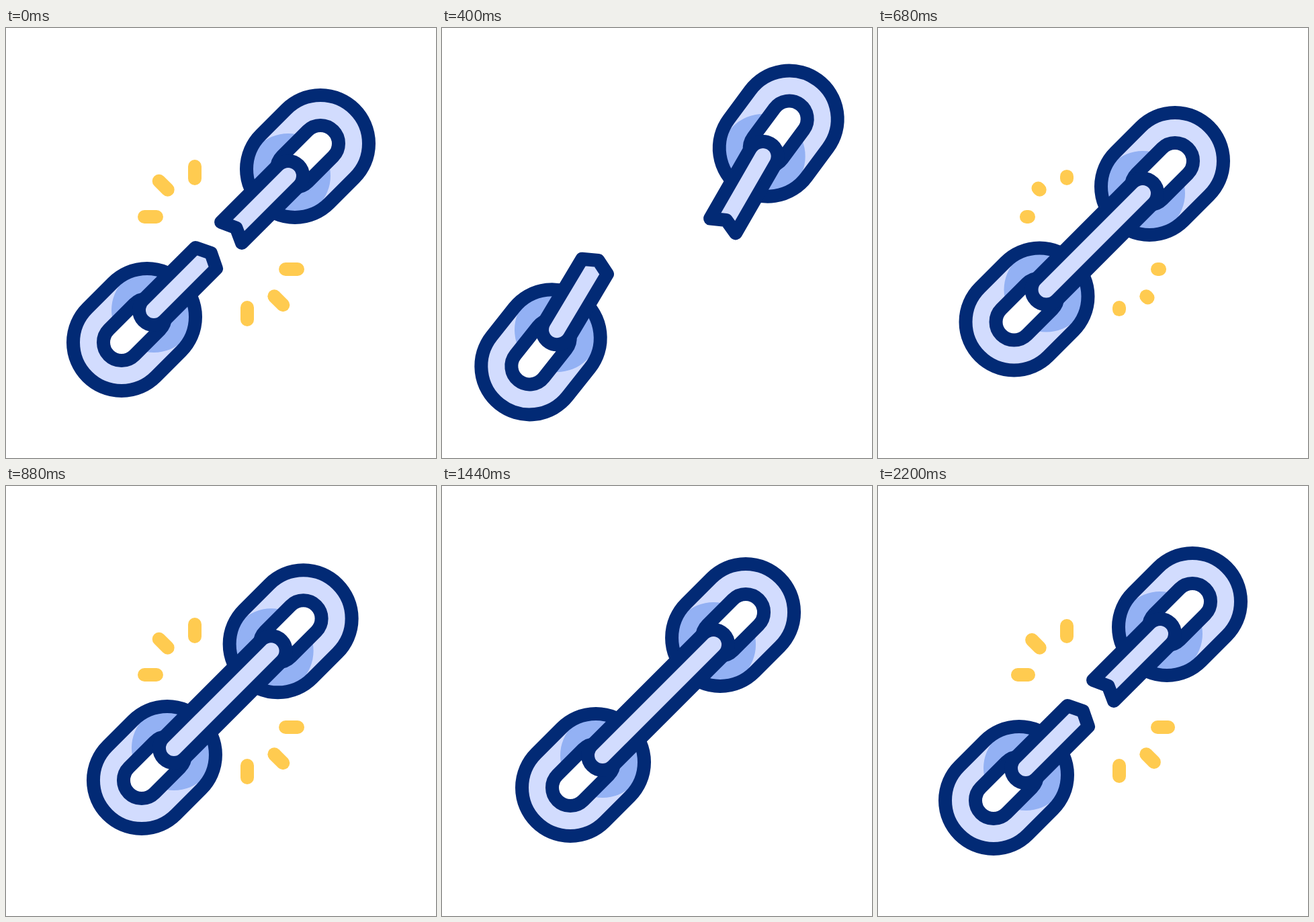
These frames come from a looping animation (640 px wide and 640 px high, 2.24 s). An HTML page with a canvas:

```html
<!DOCTYPE html>
<html lang="en">
<head>
<meta charset="utf-8">
<title>Chain link</title>
<style>
html, body { margin: 0; width: 100%; height: 100%; overflow: hidden; background: #fff; }
canvas { display: block; width: 100vw; height: 100vh; }
</style>
</head>
<body>
<canvas id="stage" width="640" height="640"></canvas>
<script>
const ctx = document.getElementById('stage').getContext('2d');
const LOOP = 2240;
const NAVY = '#022a75', PALE = '#d2dcfe', MID = '#93b1f4', GOLD = '#ffcb50';
const LINE = 20, OUTER = 72, HOLE = 27, BAR = 22, SHADE = 63;

// home: pivot at rest; side: +1 upper right, -1 lower left
// away: apex offset and tilts in degrees; shut / held: inward shifts
const halves = [
  { home: [430, 210], side: 1, away: [56, -32, 8.7, 15.4], shut: 26, held: 24.3,
    tips: [[-110, 79], [-87.5, 87.5], [-79, 110]] },
  { home: [210, 430], side: -1, away: [-47.3, 32, 6.7, 14.5], shut: 30.5, held: 29,
    tips: [[72, -103], [95, -95], [103, -72]] }
];

const clamp = u => Math.min(1, Math.max(0, u));
const span = (t, a, b) => clamp((t - a) / (b - a));
const smooth = u => u * u * (3 - 2 * u);
const mix = (a, b, u) => a + (b - a) * u;

function pose(h, t) {
  const inward = s => [-s * h.side, s * h.side, 0, 0];
  let from, to, u;
  if (t < 440) {
    from = inward(0); to = h.away; u = smooth(t / 440);
  } else if (t < 680) {
    from = h.away; to = inward(h.shut); u = smooth(span(t, 440, 680));
  } else if (t < 1220) {
    from = inward(h.shut); to = inward(h.held); u = span(t, 680, 1220);
  } else {
    from = inward(h.held); to = inward(0); u = smooth(span(t, 1220, 1780));
  }
  const [dx, dy, tilt, swing] = from.map((v, i) => mix(v, to[i], u));
  const x = h.home[0] + dx, y = h.home[1] + dy;
  const place = ([px, py], deg) => {
    const a = -deg * Math.PI / 180, c = Math.cos(a), s = Math.sin(a);
    return [x + px * c - py * s, y + px * s + py * c];
  };
  return {
    near: [x, y],
    far: place([38 * h.side, -38 * h.side], tilt),
    end: place([-10 * h.side, 10 * h.side], swing),
    tips: h.tips.map(p => place(p, swing))
  };
}

function capsule(path, a, b, r) {
  const dir = Math.atan2(b[1] - a[1], b[0] - a[0]), q = Math.PI / 2;
  path.moveTo(a[0] + r * Math.cos(dir + q), a[1] + r * Math.sin(dir + q));
  path.arc(a[0], a[1], r, dir + q, dir + 3 * q);
  path.arc(b[0], b[1], r, dir - q, dir + q);
  path.closePath();
}

function outline(path) {
  ctx.strokeStyle = NAVY;
  ctx.lineWidth = LINE;
  ctx.stroke(path);
}

function drawLink(p) {
  const ring = new Path2D();
  capsule(ring, p.near, p.far, OUTER);
  capsule(ring, p.near, p.far, HOLE);
  ctx.fillStyle = PALE;
  ctx.fill(ring, 'evenodd');
  ctx.save();
  ctx.clip(ring, 'evenodd');
  ctx.fillStyle = MID;
  ctx.beginPath();
  ctx.arc(p.end[0], p.end[1], SHADE, 0, 2 * Math.PI);
  ctx.fill();
  ctx.restore();
  outline(ring);
}

function drawBar(path) {
  ctx.fillStyle = PALE;
  ctx.fill(path);
  outline(path);
}

function brokenBar(p) {
  const path = new Path2D(), [a, v, b] = p.tips, e = p.end;
  const dir = Math.atan2(e[1] - (a[1] + b[1]) / 2, e[0] - (a[0] + b[0]) / 2);
  const q = Math.PI / 2;
  // the tip list runs clockwise on one half only
  const cross = Math.cos(dir) * (a[1] - e[1]) - Math.sin(dir) * (a[0] - e[0]);
  const [first, last] = cross < 0 ? [a, b] : [b, a];
  path.arc(e[0], e[1], BAR, dir - q, dir + q);
  path.lineTo(...last);
  path.lineTo(...v);
  path.lineTo(...first);
  path.closePath();
  return path;
}

function drawSparks(t) {
  let tail, head;
  if (t < 360) {
    tail = t / 360; head = 1;
  } else if (t >= 640 && t < 1140) {
    head = span(t, 640, 880); tail = span(t, 880, 1130);
  } else if (t > 1880) {
    tail = 0; head = span(t, 1880, LOOP);
  } else return;
  ctx.strokeStyle = GOLD;
  ctx.lineWidth = LINE;
  const rays = [[281, 224, 0, -18], [240.7, 240.7, -13, -13], [224, 281, -18, 0]];
  for (const [x, y, dx, dy] of rays) {
    for (const flip of [false, true]) {
      const at = u => {
        const px = x + dx * u, py = y + dy * u;
        return flip ? [640 - px, 640 - py] : [px, py];
      };
      ctx.beginPath();
      ctx.moveTo(...at(tail));
      ctx.lineTo(...at(Math.max(head, tail + 0.005)));
      ctx.stroke();
    }
  }
}

function draw(t) {
  ctx.fillStyle = '#fff';
  ctx.fillRect(0, 0, 640, 640);
  ctx.lineJoin = ctx.lineCap = 'round';
  const poses = halves.map(h => pose(h, t));
  drawSparks(t);
  poses.forEach(drawLink);
  if (t >= 628 && t < 1460) {
    const bar = new Path2D();
    capsule(bar, poses[1].end, poses[0].end, BAR);
    drawBar(bar);
  } else {
    poses.forEach(p => drawBar(brokenBar(p)));
  }
}

const start = performance.now();
function tick() {
  draw((performance.now() - start) % LOOP);
  requestAnimationFrame(tick);
}
tick();
</script>
</body>
</html>
```
